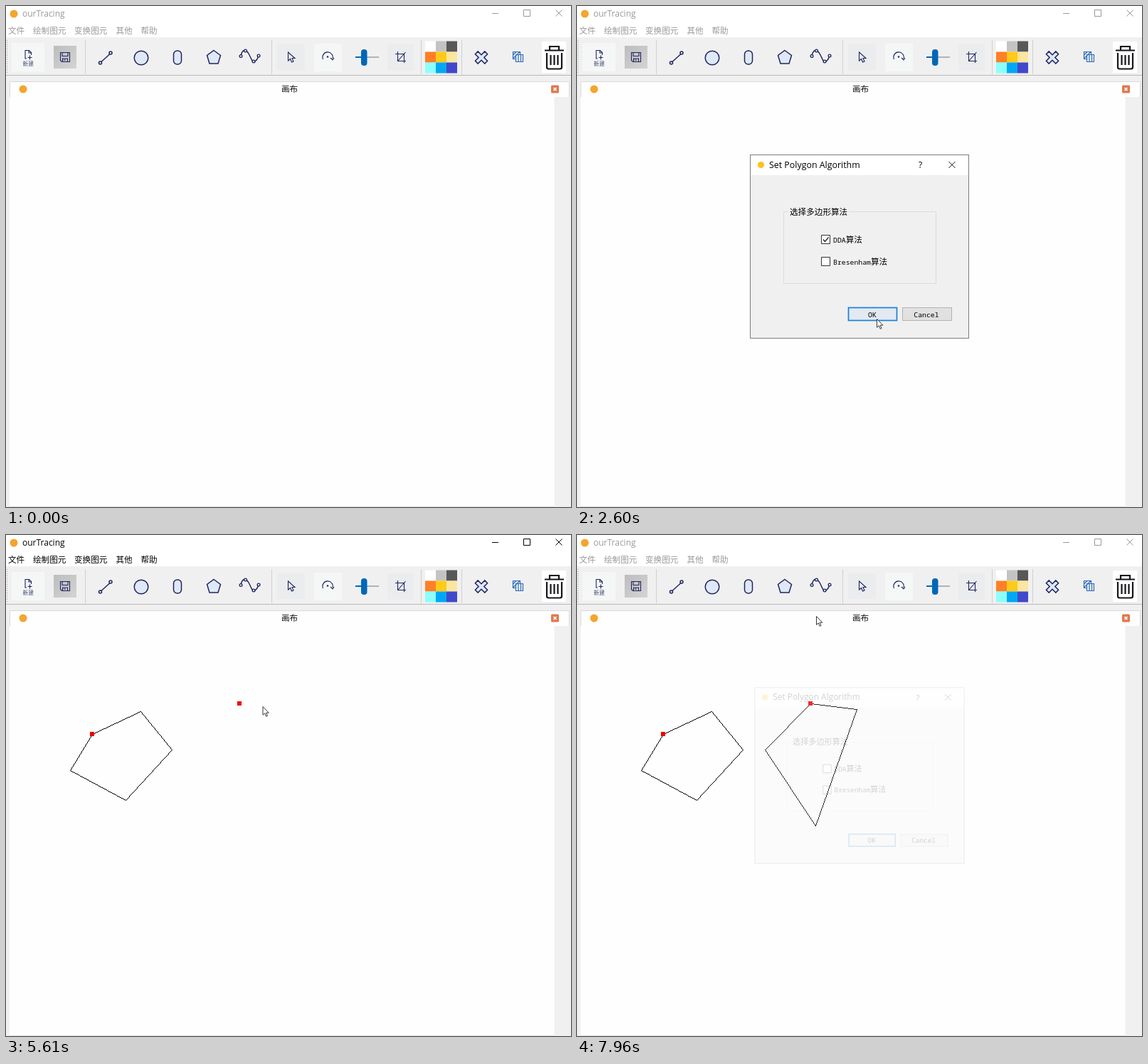
Write an HTML page that moves like this. It is 794 px wide and 705 px high and loops after 8000 ms.

```html
<!DOCTYPE html>
<html lang="zh">
<head>
<meta charset="utf-8">
<title>Drawing board</title>
<style>
html, body { margin: 0; width: 100%; height: 100%; overflow: hidden; background: #f0f0f0; }
svg { display: block; width: 794px; height: 705px; }
text { font: 11.6px "Noto Sans CJK SC", "Noto Sans CJK", sans-serif; white-space: pre; }
.ui { font: 12px "Open Sans", "Noto Sans", sans-serif; }
.mono { font: 9.8px "Noto Sans Mono", "Liberation Mono", monospace; }
.ink { fill: none; stroke: #20265f; stroke-width: 1.5; }
.tint { fill: #dfe8f7; }
.thin { stroke-width: 1.1; }
</style>
</head>
<body>
<svg viewBox="0 0 794 705">
  <rect width="794" height="705" fill="#f0f0f0"/>
  <rect width="794" height="44" fill="#fff"/>
  <circle cx="11" cy="11" r="5.5" fill="#f3a52f"/>

  <g id="caption">
    <text class="ui" x="23" y="14.5">ourTracing</text>
    <path d="M683 10.5h9M727.5 5.5h9v9h-9zM772.5 5.5l9 9m0-9l-9 9" fill="none" stroke="currentColor"/>
  </g>
  <g id="menu">
    <text x="3" y="39">文件</text>
    <text x="38" y="39">绘制图元</text>
    <text x="96" y="39">变换图元</text>
    <text x="154.5" y="39">其他</text>
    <text x="189.5" y="39">帮助</text>
  </g>

  <!-- toolbar -->
  <path d="M1.5 48v48" stroke="#a5a5a5" stroke-dasharray="1 2"/>
  <path d="M111.5 48v48M373.5 48v48M583.5 48v48M640.5 48v48" stroke="#cfcfcf"/>
  <path d="M0 97.5h794" stroke="#b9b9b9"/>
  <linearGradient id="steel" x2="1" y2="1"><stop stop-color="#bdbdbd"/><stop offset="1" stop-color="#d4d4d4"/></linearGradient>
  <rect x="67" y="56" width="32" height="32" fill="url(#steel)"/>
  <path d="M8 52h46v40h-46zM433 53h39v39h-39z" fill="#f5f7f7"/>
  <path d="M381 54h39v36h-39zM536 54h37v37h-37z" fill="#ebecee"/>
  <rect x="753" y="50" width="34" height="44" fill="#fff"/>
  <rect id="hover" x="267" y="47" width="50" height="50" fill="#e3effa"/>

  <g class="ink">
    <path class="thin" d="M29 74h-2v-11.5h5.500l3 3v3.500M32 62.500v3.500h3.500M30.500 72.500h6m-3-3v6"/>
    <path class="thin" d="M76.500 65.500h13v13h-11l-2-2zM79 65.500v5h8v-5M79.500 78v-4h7v4M81 76h3"/>
    <path d="M134 78.500L146 67.500"/>
    <circle class="tint" cx="132.500" cy="80" r="2"/>
    <circle class="tint" cx="147" cy="66" r="2"/>
    <circle class="tint" cx="190" cy="73" r="9.800"/>
    <rect class="tint" x="235.500" y="63" width="11" height="19" rx="5"/>
    <path class="tint" d="M292 62.500l9.500 7l-3.500 11.500h-12l-3.500-11.500z"/>
    <path d="M330 70C332 61 337 60 341 67S346 81 350 78S354 72 355 70"/>
    <path d="M330 70.500h.1M336.500 63h.1M348 78h.1M355 70h.1" stroke-width="5" stroke-linecap="round"/>
    <path d="M330 70.500h.1M336.500 63h.1M348 78h.1M355 70h.1" stroke="#dfe8f7" stroke-width="2.400" stroke-linecap="round"/>
    <path class="thin" d="M396.500 65v12l3-2.500l2 4.500l2.500-1l-2-4.500h4z"/>
    <path class="thin" d="M445.500 75A7.200 7.200 0 1 1 459 74M456 73l3 3l2-3"/>
    <circle class="thin" cx="452" cy="71.500" r=".8"/>
    <path class="thin" d="M550.500 64v13.500h11.500M547 67.500h12.500v12.500M550.500 77.500l11-12.500"/>
    <path class="tint" d="M-2.700-2.700v-6.800h5.400v6.800h6.800v5.400h-6.800v6.800h-5.400v-6.800h-6.800v-5.400z" transform="translate(668 72.500) rotate(45)"/>
  </g>
  <text x="23.500" y="84" style="font-size:7.700px" fill="#44486f">新建</text>

  <path d="M491 72h12" stroke="#0067b8" stroke-width="2"/>
  <path d="M503 72h21" stroke="#b0b3b8" stroke-width="2"/>
  <rect x="499" y="61" width="8.500" height="23" rx="4" fill="#0067b8"/>
  <g id="palette"></g>
  <path d="M722.500 68v-3.500h-10v10h3.500M712.500 69l4.500-4.500M712.500 74l9.500-9.500M716.500 68.500h10v10h-10zM720 68.500v10M723.500 68.500v10" fill="none" stroke="#2c6db8" stroke-width="1.200"/>
  <path d="M757 62.500h27M764 62v-5h13v5M760 66v20q0 2.500 2.500 2.500h16q2.500 0 2.500-2.500v-20M765.500 69v14m5-14v14m5-14v14" fill="none" stroke="#14141c" stroke-width="2.200"/>

  <!-- canvas panel -->
  <rect x="5" y="128" width="765.500" height="576" fill="#fefefe"/>
  <path d="M5.500 128v-21.500h786v21.500" fill="#fefefe" stroke="#dadada"/>
  <path d="M5 704.500h765" stroke="#e2e2e2"/>
  <circle cx="24" cy="117" r="5.500" fill="#f3a52f"/>
  <text x="398.500" y="121.300" text-anchor="middle" fill="#111">画布</text>
  <rect x="766" y="111.500" width="11" height="11" rx="1.500" fill="#dd7a4d"/>
  <path d="M769.500 115l4 4m0-4l-4 4" stroke="#fff" stroke-width="1.600"/>

  <path id="lines" shape-rendering="crispEdges"/>
  <path id="points" fill="#f00000"/>

  <g id="dialog">
    <rect x="243.500" y="209.500" width="307" height="258" fill="#f0f0f0" stroke="#7d7d80"/>
    <rect x="244" y="210" width="306" height="28" fill="#fff"/>
    <circle cx="258.500" cy="223.500" r="4.500" fill="#ffc21a"/>
    <text class="ui" x="270" y="227.700" style="font-size:12.400px">Set Polygon Algorithm</text>
    <text class="ui" x="480" y="228">?</text>
    <path d="M522.500 219l9 9m0-9l-9 9" stroke="#111"/>
    <rect x="290.500" y="289.500" width="214" height="101" fill="none" stroke="#dcdcdc"/>
    <rect x="297" y="282" width="85" height="14" fill="#f0f0f0"/>
    <text x="299" y="293.500">选择多边形算法</text>
    <path d="M343.500 322.500h12v12h-12zM343.500 353.500h12v12h-12z" fill="#fff" stroke="#333"/>
    <path id="check" d="M346 328.500l2.500 3l5-6" fill="none" stroke="#222" stroke-width="1.300"/>
    <text x="360" y="333"><tspan class="mono">DDA</tspan>算法</text>
    <text x="360" y="363.500"><tspan class="mono">Bresenham</tspan>算法</text>
    <rect id="ok" x="381.500" y="424.500" width="68" height="18" stroke="#1a80d4" stroke-width="1.700"/>
    <rect x="457.500" y="424.500" width="69" height="18" fill="#e1e1e1" stroke="#b3b3b3"/>
    <text class="mono" x="415" y="437.500" text-anchor="middle">OK</text>
    <text class="mono" x="491" y="437.500" text-anchor="middle">Cancel</text>
  </g>

  <g id="cursor">
    <circle id="press" r="11.500" fill="#ff0" opacity=".5"/>
    <path d="M.5 .5v11.800l2.700-2.500l2 4.500l1.800-.8l-1.900-4.300h3.700z" fill="#fff" stroke="#222" stroke-width=".9"/>
  </g>
</svg>

<script>
const $ = id => document.getElementById(id);
const set = (id, attrs) => { for (const k in attrs) $(id).setAttribute(k, attrs[k]); };
const show = (id, on) => set(id, { display: on ? 'inline' : 'none' });
const ease = k => (k = Math.max(0, Math.min(1, k))) * k * k * (10 + k * (6 * k - 15));

// Time runs in steps after a short lead-in
const LOOP = 8000, LEAD = 290, STEP = 77.47;
const OPEN = 12, REOPEN = 97, CHECK = 23, ACCEPT = 33, CLOSE = 36;

// Vertices are clicked at an even pace, each edge follows its click
const polygons = [
  { start: 42, gap: 3.3, pts: [[121, 280], [189, 248], [233, 302], [168, 373], [90, 331]] },
  { start: 66, gap: 5.3, pts: [[328, 237], [393, 245], [335, 409], [264, 302]] }
];
const TOOL = [292, 72];
const clicks = [
  [OPEN, ...TOOL], [CHECK, 384, 332], [ACCEPT, 421, 443], [REOPEN, ...TOOL],
  ...polygons.flatMap(({ start, gap, pts }) => pts.map((p, i) => [Math.round(start + gap * i), ...p]))
];
// Pointer stops: the clicks, each held for one step, and a few places between
const stops = [
  [0, 505, 528], [6, 129, 206], [10, ...TOOL], [15, 363, 147], [30, 421, 440],
  [41, 125.5, 275.5], [79, 281, 343], [91, ...TOOL], [99, 336, 114],
  ...clicks.flatMap(([s, x, y]) => [[s, x, y], [s + 1, x, y]])
].sort((a, b) => a[0] - b[0]);

function pointer(n) {
  const i = Math.max(1, stops.findIndex(s => s[0] >= n));
  const [a, x, y] = stops[i - 1], [b, u, v] = stops[i];
  const e = ease((n - a) / (b - a));
  return [x + (u - x) * e, y + (v - y) * e];
}

// DDA: one pixel for each step along the longer axis
function dda([x, y], [u, v]) {
  const count = Math.max(Math.abs(u - x), Math.abs(v - y));
  let d = '';
  for (let i = 0; i <= count; i++) {
    d += `M${Math.round(x + (u - x) * i / count)} ${Math.round(y + (v - y) * i / count)}h1v1h-1z`;
  }
  return d;
}

function drawShapes(n) {
  let lines = '', points = '';
  for (const { start, gap, pts } of polygons) {
    if (n <= start) continue;
    points += `M${pts[0][0] - 3} ${pts[0][1] - 3}h6v6h-6z`;
    pts.forEach((p, i) => {
      if (n > Math.round(start + gap * (i + 1))) lines += dda(p, pts[(i + 1) % pts.length]);
    });
  }
  set('lines', { d: lines });
  set('points', { d: points });
}

function drawDialog(n, [x, y]) {
  const opened = n < REOPEN ? OPEN : REOPEN;
  const shown = ease((n - opened - 1.4) / 2);
  const alpha = opened === OPEN ? Math.min(shown, ease((CLOSE + 3 - n) / 3)) : shown;
  const scale = .957 + .043 * alpha ** 2;
  show('dialog', alpha > 0);
  set('dialog', { opacity: alpha, transform: `translate(397 338.5) scale(${scale}) translate(-397 -338.5)` });
  show('check', n > CHECK && n < REOPEN);
  set('ok', { fill: x > 381 && x < 450 && y > 424 && y < 444 ? '#e2e9f2' : '#e4e4e4' });
}

function draw(n) {
  const spot = pointer(n), [x, y] = spot;
  const clicked = n >= OPEN - 1 && n < OPEN + 2;
  const tint = (id, on) => set(id, { fill: on ? '#000' : '#999', color: on ? '#000' : '#999' });
  tint('caption', clicked || n >= CLOSE && n < REOPEN + 2);
  tint('menu', clicked || n > CLOSE && n < REOPEN + 2);

  show('cursor', n >= 0);
  show('press', clicks.some(([s]) => n === s || n === s - 1));
  set('cursor', { transform: `translate(${x} ${y})` });
  show('hover', n >= 0 && x > 267 && x < 317 && y > 47 && y < 97);

  drawDialog(n, spot);
  drawShapes(n);
}

$('palette').innerHTML = ['#fff', '#c3c3c3', '#585858', '#ff7f27', '#ffca18', '#fbe6a0', '#8cfffb', '#00a8f3', '#4248cc']
  .map((c, i) => `<rect x="${589 + i % 3 * 15}" y="${49.5 + (i / 3 | 0) * 15}" width="15" height="15" fill="${c}"/>`).join('');

let last;
function tick() {
  const t = performance.now() % LOOP;
  const n = t < LEAD ? -1 : Math.min(99, Math.floor((t - LEAD + 35) / STEP));
  if (n !== last) draw(last = n);
  requestAnimationFrame(tick);
}
tick();
</script>
</body>
</html>
```
